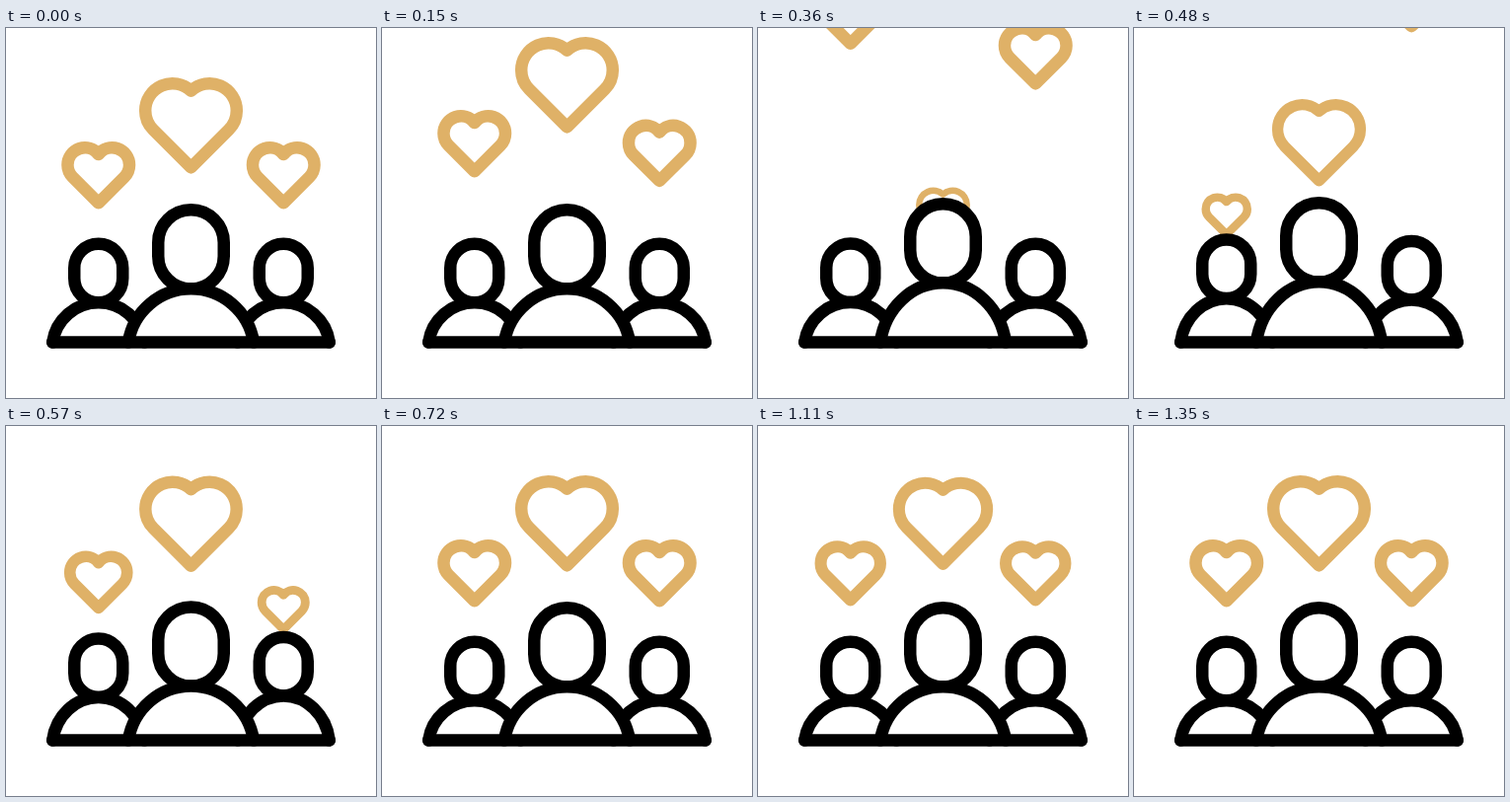
An HTML page that plays this animation: 375 px wide and 375 px high, repeating every 1.5 s.

```html
<!DOCTYPE html>
<html lang="en">
<head>
<meta charset="utf-8">
<title>People and hearts</title>
<style>
  html, body { margin: 0; width: 100%; height: 100%; overflow: hidden; background: #fff; }
  svg { display: block; width: 100%; height: 100%; }
  svg * { stroke-width: 12.5; stroke-linecap: round; stroke-linejoin: round; }
  .heart { fill: none; stroke: #dfb167; }
  .person { fill: #fff; stroke: #000; }
</style>
</head>
<body>
<svg id="stage" viewBox="0 0 375 375"></svg>
<script>
const LOOP = 1500, STEP = 30, FLOOR = 318.5;
const stage = document.getElementById('stage');

// Sides come first so that the middle person covers their shoulders.
// exit: rise at 150 ms and 270 ms, then speed in px/ms
const people = [
  { x: 93.75, heartY: 149.5, heart: [31.3, -28.2, 17.5], head: [49, 218.75, 59.5],
    body: [46.5, 40.5, 47], exit: [32, 103, 0.65],
    born: 391, grow: 270, size: 0.21, hop: 355, lift: 4.3 },
  { x: 281.25, heartY: 149.5, heart: [31.3, -28.2, 17.5], head: [49, 218.75, 59.5],
    body: [46.5, 40.5, 47], exit: [22.4, 77.3, 0.485],
    born: 485, grow: 235, size: 0.21, hop: 420, lift: 4.8 },
  { x: 187.5, heartY: 99, heart: [46.3, -42.75, 27.5], head: [66.5, 184.25, 80.25],
    body: [63.5, 54, 64.3], exit: [41, 122, 0.675],
    born: 320, grow: 270, size: 0.32, hop: 280, lift: 8 }
];

function add(tag, attrs) {
  const node = document.createElementNS('http://www.w3.org/2000/svg', tag);
  for (const key in attrs) node.setAttribute(key, attrs[key]);
  return stage.appendChild(node);
}

// Two round lobes joined by 45 degree sides.
function heartPath([half, top, r]) {
  const cx = half - r, cy = top + r, k = r * Math.SQRT1_2;
  const notch = cy - Math.sqrt(r * r - cx * cx);
  const arc = `A${r} ${r} 0 0 0 `;
  return `M0 ${notch}${arc}${-half} ${cy}${arc}${-cx - k} ${cy + k}` +
    `L0 ${cy + cx + 2 * k}L${cx + k} ${cy + k}${arc}${half} ${cy}${arc}0 ${notch}Z`;
}

function bodyPath(x, [half, rise, r], lift) {
  const ry = r * (rise + lift) / rise;
  return `M${x - half} ${FLOOR}A${r} ${ry} 0 0 1 ${x + half} ${FLOOR}`;
}

for (const p of people) p.heartNode = add('path', { class: 'heart', d: heartPath(p.heart) });
for (const p of people) {
  const [w, y, h] = p.head;
  p.headNode = add('rect', { class: 'person', x: p.x - w / 2, y, width: w, height: h, rx: w / 2 });
  p.bodyNode = add('path', { class: 'person' });
}
add('path', { class: 'person', d: `M47.25 ${FLOOR}H327.75` });

const clamp = u => Math.min(1, Math.max(0, u));
const mix = (a, b, u) => a + (b - a) * u;
const smooth = u => (1 - Math.cos(Math.PI * clamp(u))) / 2;

function exitRise([a, b, speed], t) {
  if (t < 150) return a * clamp((t - 30) / 120) ** 2;
  if (t < 270) return mix(a, b, (t - 150) / 120);
  return b + speed * (t - 270);
}

function pulse(t) {
  return 1 - 0.04 * smooth((t - 960) / 130)
    + 0.08 * smooth((t - 1090) / 130)
    - 0.04 * smooth((t - 1220) / 130);
}

function pose(t) {
  for (const p of people) {
    let y = p.heartY, scale = pulse(t);
    if (t < p.born) {
      y -= exitRise(p.exit, t);
    } else {
      const u = 1 - (1 - clamp((t - p.born) / p.grow)) ** 2.2;
      const headMid = p.head[1] + p.head[2] / 2;
      y = mix(headMid, p.heartY, u);
      scale *= mix(p.size, 1, u);
    }
    p.heartNode.setAttribute('transform', `translate(${p.x} ${y}) scale(${scale})`);

    const lift = p.lift * Math.sin(Math.PI * clamp((t - p.hop) / 300));
    p.headNode.setAttribute('transform', `translate(0 ${-lift})`);
    p.bodyNode.setAttribute('d', bodyPath(p.x, p.body, lift));
  }
}

const start = performance.now();
function tick() {
  const t = (performance.now() - start) % LOOP;
  pose(Math.floor(t / STEP) * STEP);
  requestAnimationFrame(tick);
}
tick();
</script>
</body>
</html>
```
